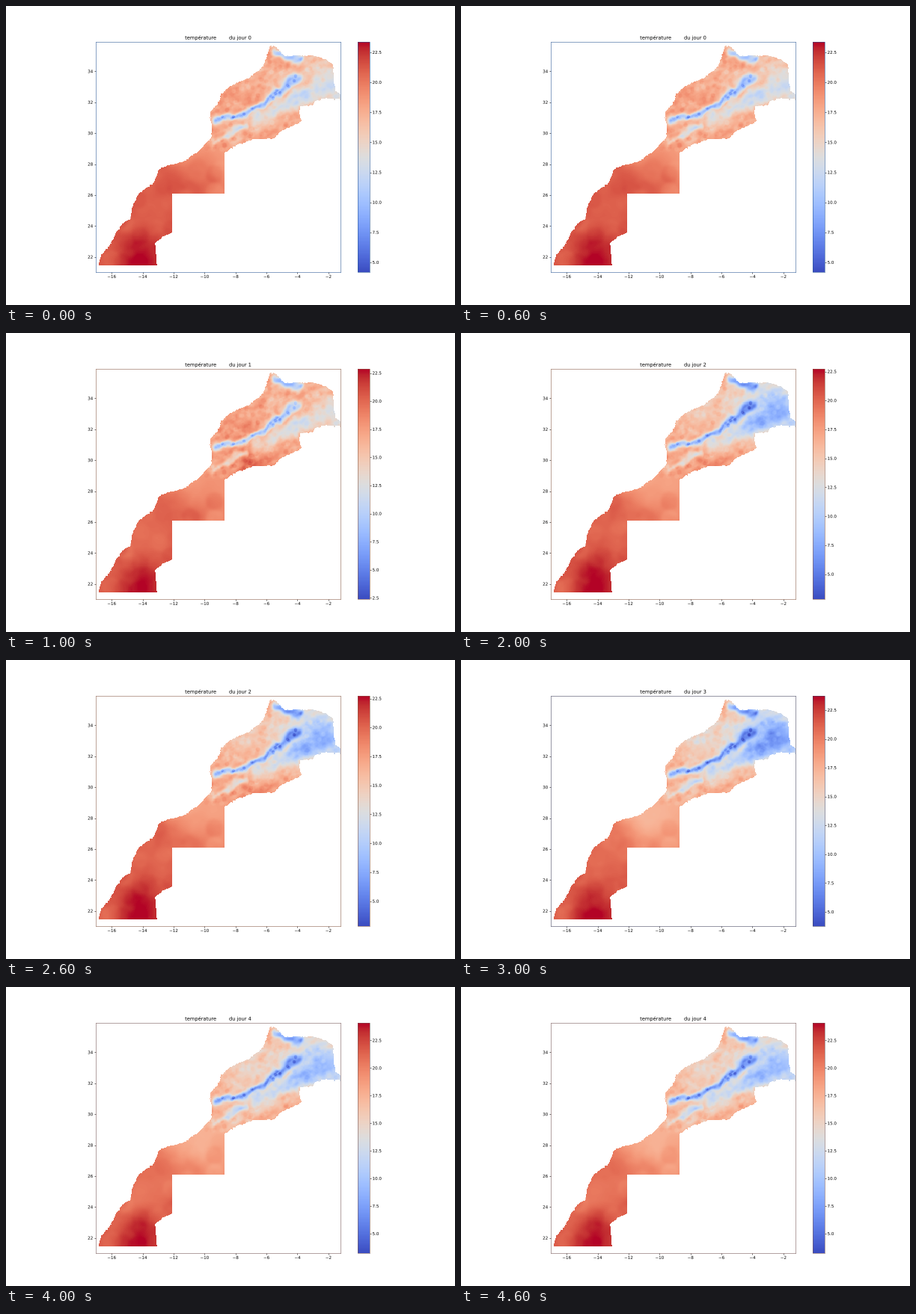
These frames come from a looping animation (600 px wide and 400 px high, 5000 ms). A matplotlib script:

```python
import numpy as np
import matplotlib.pyplot as plt
from matplotlib.animation import FuncAnimation
from matplotlib.path import Path
from matplotlib.patheffects import Normal
from matplotlib.ticker import MultipleLocator

# Widths that snap to a single pixel at this low resolution
plt.rcParams.update({"axes.linewidth": 1.0, "xtick.major.width": 1.0,
                     "ytick.major.width": 1.0})

# Map window in degrees, and the same window in stage pixels
EXTENT = (-17.02, -1.22, 21.02, 35.905)
LEFT, RIGHT, TOP, BOTTOM = 120.1, 447.0, 48.0, 356.0
COLS, ROWS = 316, 298
DX, DY = (RIGHT - LEFT) / COLS, (BOTTOM - TOP) / ROWS
X, Y = np.meshgrid(LEFT + DX * (np.arange(COLS) + 0.5),
                   TOP + DY * (np.arange(ROWS) + 0.5))

# Coldest value, warmest value and frame tint of each day
DAYS = [(4.19, 23.37, "#2c5896"), (2.40, 22.87, "#8a5c48"), (2.85, 22.73, "#8a5c48"),
        (3.77, 23.73, "#454560"), (3.24, 24.09, "#785858")]

# Key points of the outline; the detail between them is random
COAST = [
    (447, 119), (440, 113), (437, 100), (436, 78), (428, 71), (408, 65),
    (372, 66), (360, 54), (352, 53), (348, 66), (341, 83), (328, 93),
    (300, 106), (287, 117), (283, 130), (272, 142), (275, 163), (274, 176),
    (257, 193), (239, 207), (204, 217), (196, 237), (177, 250), (168, 269),
    (165, 284), (152, 294), (137, 321), (127, 333), (123.5, 346),
]
SOUTH_BORDER = [
    (123.5, 346.5), (201, 346.5), (198.5, 316), (209, 308.5), (222, 303),
    (222, 250.5), (291, 250.5), (291, 196),
]
EAST_BORDER = [
    (292, 195), (305, 187), (330, 178.5), (357, 177), (370, 165), (394, 154),
    (391, 141), (394, 134), (410, 131), (411, 126), (430, 123.5), (447, 124.5),
]

# Warmth against distance from the hot southern corner
HOT = (185, 340)
REACH = [0, 25, 55, 120, 160, 200, 250, 340]
WARMTH = [1.0, .95, .88, .87, .77, .70, .73, .64]

# Cold high ground: depth, half width, two or more crest points
HIGH = (.38, 4.5, [(279, 151), (312, 148), (345, 131), (362, 112)])
MIDDLE = (.34, 7, [(352, 126), (388, 96)])
CHAINS = [
    HIGH, MIDDLE,
    (.22, 4, [(276, 183), (318, 160)]),
    (.32, 5, [(362, 62), (393, 73)]),
    (.24, 12, [(335, 152), (400, 118)]),
    (.20, 22, [(415, 112), (445, 105)]),
]

# Passing weather: centre, radius, change on days 0 to 4
FRONTS = [
    ((410, 98), 40, (0, .07, -.24, -.32, -.20)),
    ((320, 108), 42, (0, .02, -.10, -.16, -.14)),
    ((325, 172), 35, (0, .13, .07, -.02, -.05)),
    ((250, 220), 45, (0, -.03, -.06, -.14, -.12)),
    ((165, 285), 45, (0, -.03, .00, -.01, -.05)),
    ((370, 66), 14, (0, -.12, -.10, -.05, -.05)),
]


def rough(points, rng, step=1.5, size=0.45):
    """Resample a line finely and shake it a little."""
    pts = np.array(points, float)
    run = np.r_[0, np.cumsum(np.hypot(*np.diff(pts, axis=0).T))]
    s = np.arange(0, run[-1], step)
    line = np.c_[np.interp(s, run, pts[:, 0]), np.interp(s, run, pts[:, 1])]
    return line + rng.normal(0, size, line.shape)


def ridge(depth, width, crest):
    """Cold band along a crest line with wavy edges."""
    px = X + 2.0 * np.sin(Y / 5 + X / 11) + 1.2 * np.sin(X / 3.5)
    py = Y + 1.5 * np.sin(X / 6 - Y / 9) + 1.0 * np.sin(X / 2.7 + Y / 4)
    near = np.full_like(X, np.inf)
    for (x0, y0), (x1, y1) in zip(crest, crest[1:]):
        ux, uy = x1 - x0, y1 - y0
        k = np.clip(((px - x0) * ux + (py - y0) * uy) / (ux * ux + uy * uy), 0, 1)
        near = np.minimum(near, np.hypot(px - x0 - k * ux, py - y0 - k * uy))
    return depth * np.exp(-(near / width) ** 2)


def dab(field, x, y, r, amp, stretch=1):
    """Add one disc, optionally drawn out along the mountains."""
    reach = 2 * r * stretch
    c0, c1 = (int(np.clip((x + s * reach - LEFT) / DX, 0, COLS)) for s in (-1, 1))
    r0, r1 = (int(np.clip((y + s * reach - TOP) / DY, 0, ROWS)) for s in (-1, 1))
    win = np.s_[r0:r1, c0:c1]
    dx, dy = X[win] - x, Y[win] - y
    u, v = (0.87 * dx - 0.5 * dy) / stretch, 0.5 * dx + 0.87 * dy
    field[win] += amp / (1 + (np.hypot(u, v) / r) ** 8)


def speckle(rng, box, step, r, amp, stretch=1):
    """Scatter discs of random strength over a box."""
    field = np.zeros_like(X)
    x0, x1, y0, y1 = box
    for y in np.arange(y0, y1, step):
        for x in np.arange(x0, x1, step):
            jx, jy = rng.uniform(-0.4, 0.4, 2) * step
            dab(field, x + jx, y + jy, r, rng.normal(0, amp), stretch)
    return field


def texture(rng, k=1.0):
    north, south = (266, 448, 50, 192), (124, 296, 202, 350)
    return (speckle(rng, north, 5, 3.0, 0.022 * k)
            + speckle(rng, north, 9, 4.0, 0.020 * k, stretch=2.5)
            + speckle(rng, south, 20, 12, 0.020 * k))


def terrain(rng):
    """Warmth from 0 to 1 before any weather."""
    level = np.interp(np.hypot(X - HOT[0], Y - HOT[1]), REACH, WARMTH)
    level -= np.max([ridge(*chain) for chain in CHAINS], axis=0)
    for _, width, crest in (HIGH, MIDDLE):
        for x, y in rough(crest, rng, step=5, size=width / 3):
            dab(level, x, y, 2.2, -rng.uniform(0, 0.16))
    return level + texture(rng)


def weather(day):
    change = texture(np.random.default_rng(40 + day), 0.4)
    for (x, y), radius, shift in FRONTS:
        change += shift[day] * np.exp(-((X - x) ** 2 + (Y - y) ** 2) / radius ** 2)
    return change


def build():
    rng = np.random.default_rng(12)
    outline = np.vstack([rough(COAST, rng), SOUTH_BORDER, rough(EAST_BORDER, rng)]) + 0.5
    land = Path(outline).contains_points(np.c_[X.ravel(), Y.ravel()]).reshape(X.shape)
    base = terrain(rng)
    maps = []
    for day, (low, high, _) in enumerate(DAYS):
        level = np.clip(base + weather(day), 0, 1)
        maps.append(np.ma.masked_where(~land, low + (high - low) * level))
    return maps


MAPS = build()

fig, ax = plt.subplots(figsize=(15, 10), dpi=40)
im = ax.imshow(MAPS[0], cmap="coolwarm", extent=EXTENT, interpolation="nearest")
ax.xaxis.set_major_locator(MultipleLocator(2))
ax.yaxis.set_major_locator(MultipleLocator(2))
bar = fig.colorbar(im, ax=ax, ticks=MultipleLocator(2.5))
title = ax.set_title("")


def show(day):
    low, high, tint = DAYS[day]
    im.set_data(MAPS[day])
    im.set_clim(low, high)
    title.set_text(f"température        du jour {day}")
    for edge in (*ax.spines.values(), bar.outline):
        edge.set_edgecolor(tint)
    # Drawn as outlines, small text keeps its true spacing
    labels = ax.get_xticklabels() + ax.get_yticklabels() + bar.ax.get_yticklabels()
    for text in (title, *labels):
        text.set_path_effects([Normal()])
    return im, title


anim = FuncAnimation(fig, show, frames=len(DAYS), interval=1000,
                     init_func=lambda: show(0), repeat=True, repeat_delay=0, blit=False)
plt.show()
```
